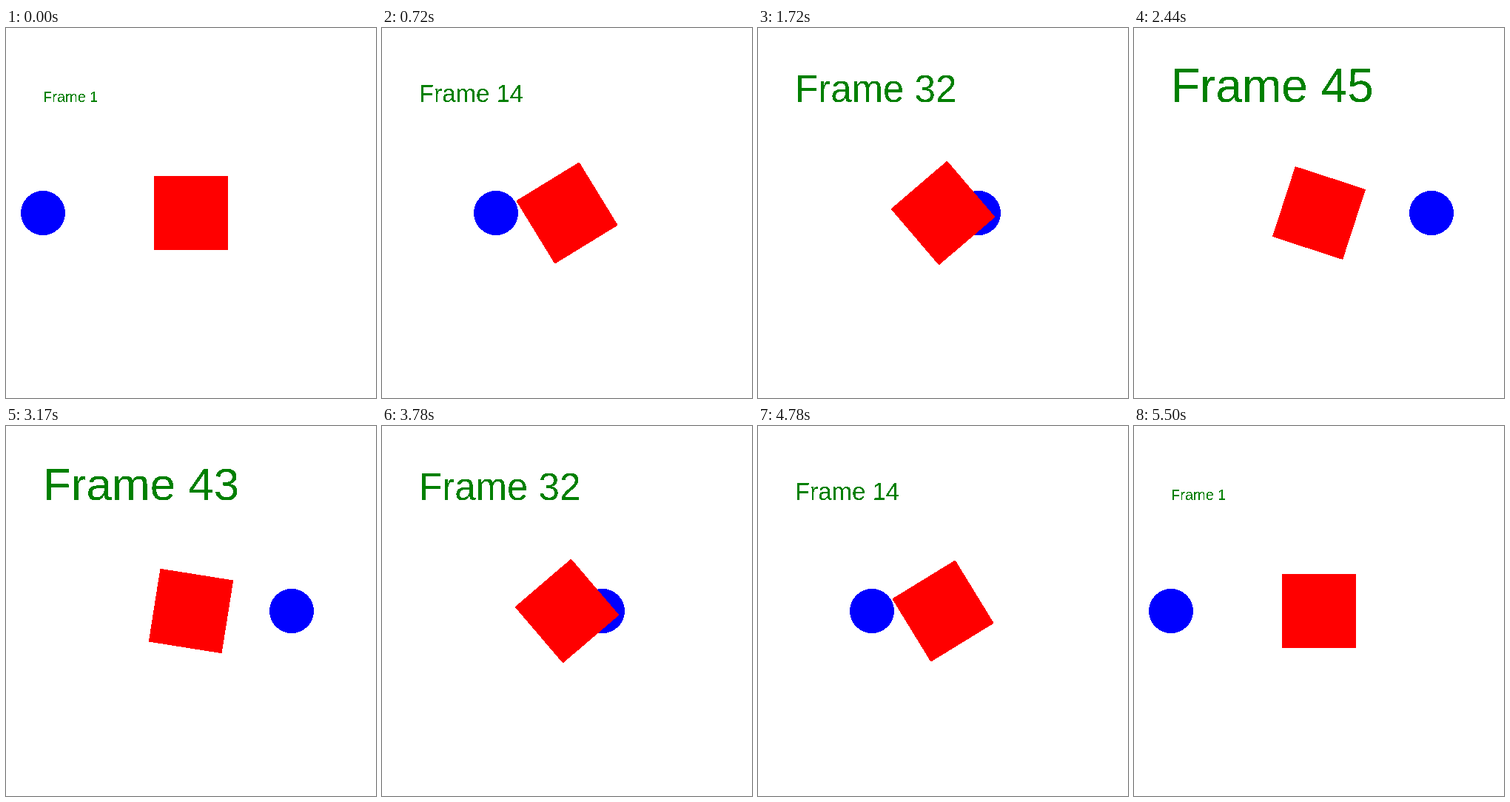
An HTML page with a canvas that plays this animation: 500 px wide and 500 px high, repeating every 5560 ms.

```html
<!DOCTYPE html>
<html lang="en">
<head>
<meta charset="utf-8">
<title>Circle, square and counter</title>
<style>
  html, body { margin: 0; width: 100%; height: 100%; overflow: hidden; background: #fff; }
  canvas { display: block; width: 500px; height: 500px; }
</style>
</head>
<body>
<canvas id="stage" width="500" height="500"></canvas>
<script>
const SIZE = 500;
const STEPS = 50;            // steps one way; the loop runs there and back
const FPS = 18;
const LOOP = 5560;
const PALETTE = [[255, 255, 255], [255, 0, 0], [0, 0, 255], [0, 128, 0]];

const ctx = document.getElementById('stage').getContext('2d', { willReadFrequently: true });
const start = performance.now();
let shown = -1;

// Ticks fall on whole hundredths of a second.
const tickTime = i => Math.round(i * 100 / FPS) * 10;

function tickAt(t) {
  let i = Math.min(2 * STEPS - 1, Math.ceil(t * FPS / 1000) + 1);
  while (i > 0 && tickTime(i) > t) i--;
  return i;
}

// Hard edges: every pixel takes the nearest flat colour.
function snapColors() {
  const image = ctx.getImageData(0, 0, SIZE, SIZE);
  const d = image.data;
  for (let p = 0; p < d.length; p += 4) {
    if (d[p] === 255 && d[p + 1] === 255 && d[p + 2] === 255) continue;
    let best = PALETTE[0], least = Infinity;
    for (const c of PALETTE) {
      const dist = (d[p] - c[0]) ** 2 + (d[p + 1] - c[1]) ** 2 + (d[p + 2] - c[2]) ** 2;
      if (dist < least) { least = dist; best = c; }
    }
    d[p] = best[0];
    d[p + 1] = best[1];
    d[p + 2] = best[2];
  }
  ctx.putImageData(image, 0, 0);
}

function draw(step) {
  ctx.fillStyle = '#fff';
  ctx.fillRect(0, 0, SIZE, SIZE);

  ctx.fillStyle = '#00f';
  ctx.beginPath();
  ctx.arc(50 + 8 * step, 250, 30, 0, 2 * Math.PI);
  ctx.fill();

  ctx.save();
  ctx.translate(250, 250);
  ctx.rotate(step * 4.5 * Math.PI / 180);
  ctx.fillStyle = '#f00';
  ctx.fillRect(-50, -50, 100, 100);
  ctx.restore();

  ctx.fillStyle = '#008000';
  ctx.font = `${20 + step}px "Liberation Sans", Arial, sans-serif`;
  ctx.fillText(`Frame ${step + 1}`, 50, 100);

  snapColors();
}

function update() {
  const tick = tickAt((performance.now() - start) % LOOP);
  const step = tick < STEPS ? tick : 2 * STEPS - 1 - tick;
  if (step !== shown) {
    shown = step;
    draw(step);
  }
  requestAnimationFrame(update);
}

update();
</script>
</body>
</html>
```
